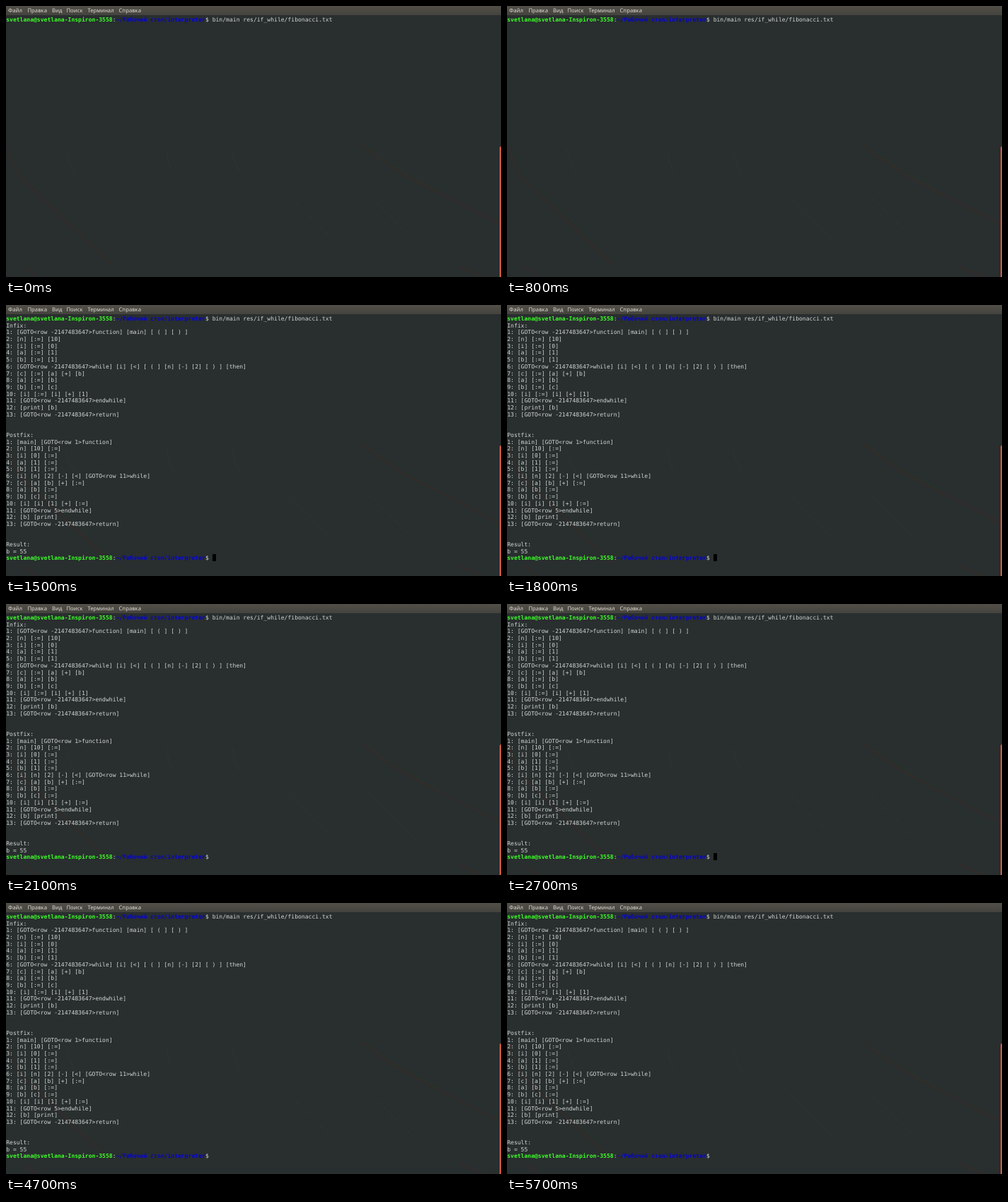
An HTML page that plays this animation: 700 px wide and 384 px high, repeating every 5800 ms.

```html
<!DOCTYPE html>
<html lang="ru">
<head>
<meta charset="utf-8">
<title>Терминал</title>
<style>
html, body { margin: 0; width: 100%; height: 100%; overflow: hidden; background: #292e2f; }
svg { display: block; }
text { white-space: pre; text-rendering: geometricPrecision; }
#term { font: 8.07px "DejaVu Sans Mono", monospace; fill: #d2d6d5; }
#menu { font: 7.7px "Noto Sans", "Open Sans", sans-serif; fill: #dedbd3; }
.user { font-weight: bold; fill: #3cff28; }
.path { font-weight: bold; fill: #0404d0; }
.wall { fill: none; stroke-linecap: round; }
</style>
</head>
<body>
<svg width="700" height="384" viewBox="0 0 700 384">
  <defs>
    <linearGradient id="bar" x2="0" y2="1">
      <stop stop-color="#524f48"/><stop offset="1" stop-color="#44433d"/>
    </linearGradient>
  </defs>
  <rect width="700" height="384" fill="#292e2f"/>
  <g class="wall" stroke="#402c24" stroke-width="2.5" opacity=".4">
    <path d="M4 201Q7 226 24 246L148 365M503 196Q540 228 600 259T698 309M26 370L42 383M642 370L672 383"/>
    <path d="M8 201Q12 224 28 242L130 340M510 198Q550 230 612 262" stroke="#263a2b" stroke-width="2"/>
  </g>
  <path class="wall" stroke="#333839" opacity=".5" d="M395 265L460 330M510 265L575 330M84 202Q88 222 98 238M228 204Q228 222 236 236M320 204Q322 222 332 238"/>
  <rect width="700" height="13" fill="url(#bar)"/>
  <g id="menu"></g>
  <path d="M698 384V200.5Q698 199 700 199V384Z" fill="#d75b3d"/>
  <g id="term">
    <g id="command"></g>
    <g id="output"></g>
    <rect id="cursor" x="292" y="353" width="5" height="10" fill="#000"/>
  </g>
</svg>
<script>
const LOOP = 5800, RUN = 1500, BLINK = 600;
const COL = 4.858, ROW = 9.7;
const $ = id => document.getElementById(id);

function addText(parent, x, y, string, cls = '') {
  const node = document.createElementNS('http://www.w3.org/2000/svg', 'text');
  node.setAttribute('x', x);
  node.setAttribute('y', y);
  node.setAttribute('class', cls);
  node.textContent = string;
  parent.append(node);
}

function print(parent, row, col, string, cls) {
  addText(parent, 0.2 + col * COL, 21.9 + row * ROW, string, cls);
}

function prompt(parent, row, command = '') {
  const parts = [
    ['svetlana@svetlana-Inspiron-3558', 'user'],
    [':'],
    ['~/Рабочий стол/interpreter', 'path'],
    ['$ ' + command]
  ];
  let col = 0;
  for (const [string, cls] of parts) {
    print(parent, row, col, string, cls);
    col += string.length;
  }
}

const numbered = code => code.trim().split('\n').map((line, i) => `${i + 1}: ${line}`);

const infix = numbered(`
[GOTO<row -2147483647>function] [main] [ ( ] [ ) ]
[n] [:=] [10]
[i] [:=] [0]
[a] [:=] [1]
[b] [:=] [1]
[GOTO<row -2147483647>while] [i] [<] [ ( ] [n] [-] [2] [ ) ] [then]
[c] [:=] [a] [+] [b]
[a] [:=] [b]
[b] [:=] [c]
[i] [:=] [i] [+] [1]
[GOTO<row -2147483647>endwhile]
[print] [b]
[GOTO<row -2147483647>return]`);

const postfix = numbered(`
[main] [GOTO<row 1>function]
[n] [10] [:=]
[i] [0] [:=]
[a] [1] [:=]
[b] [1] [:=]
[i] [n] [2] [-] [<] [GOTO<row 11>while]
[c] [a] [b] [+] [:=]
[a] [b] [:=]
[b] [c] [:=]
[i] [i] [1] [+] [:=]
[GOTO<row 5>endwhile]
[b] [print]
[GOTO<row -2147483647>return]`);

const lines = ['Infix:', ...infix, '', '', 'Postfix:', ...postfix, '', '', 'Result:', 'b = 55'];

[['Файл', 3], ['Правка', 30.5], ['Вид', 65], ['Поиск', 85.5], ['Терминал', 115.5], ['Справка', 159.5]]
  .forEach(([label, x]) => addText($('menu'), x, 9.4, label));

prompt($('command'), 0, 'bin/main res/if_while/fibonacci.txt');
lines.forEach((line, i) => print($('output'), i + 1, 0, line));
prompt($('output'), lines.length + 1);

const show = (id, on) => $(id).setAttribute('visibility', on ? 'visible' : 'hidden');
const start = performance.now();

function draw() {
  const t = (performance.now() - start) % LOOP;
  const done = t >= RUN;
  show('output', done);
  show('cursor', done && Math.floor((t - RUN) / BLINK) % 2 === 0);
  requestAnimationFrame(draw);
}
draw();
</script>
</body>
</html>
```
